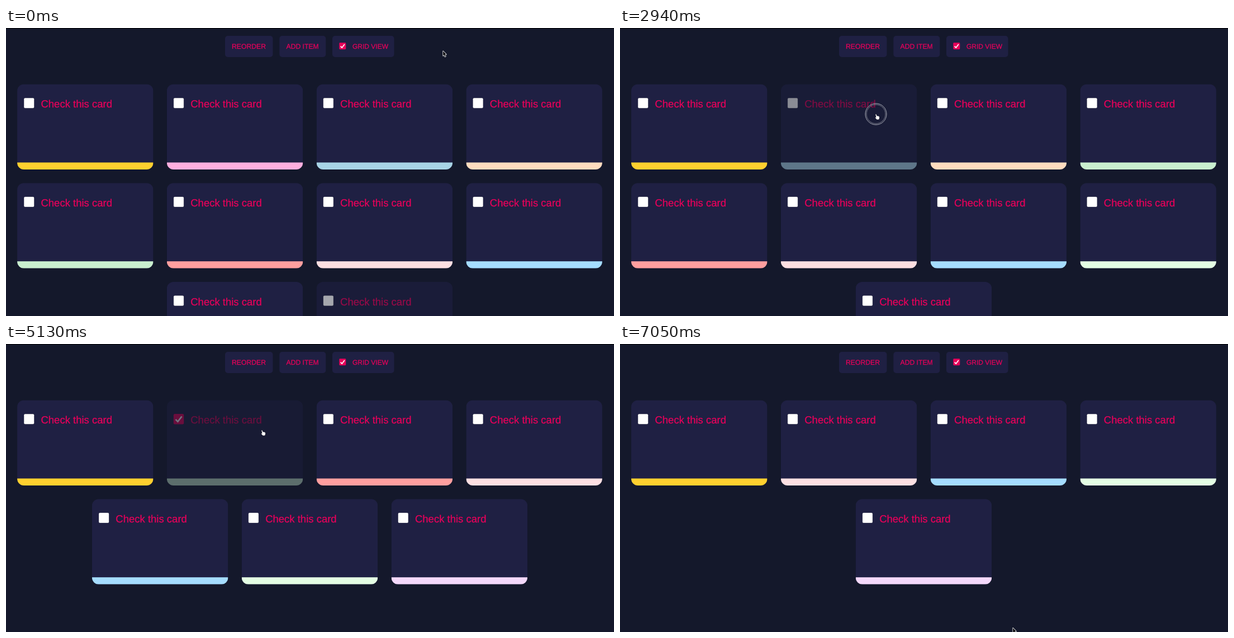
Animation of 1088 by 515 pixels, one loop 7.11 s. Source, as an HTML page with a canvas:

```html
<!DOCTYPE html>
<html lang="en">
<head>
<meta charset="utf-8">
<title>Card grid</title>
<style>
  html, body { margin: 0; width: 100%; height: 100%; overflow: hidden; background: #14182b; }
  canvas { display: block; width: 1088px; height: 515px; }
</style>
</head>
<body>
<canvas id="stage" width="1088" height="515"></canvas>
<script>
const W = 1088, H = 515, LOOP = 7110, STEP = 30;
const BG = '#14182b', PANEL = '#1f2043', RED = '#e8005a';
const FONT = '"Liberation Sans", Arial, sans-serif';
const COLORS = ['#ffd02f', '#ffafdf', '#a8d4e6', '#ffdcbf', '#c9efcf',
                '#ff9f9f', '#fddfe2', '#a5dcff', '#e4fde4', '#f4d8fb'];
const CARD = { w: 243.5, h: 152.5, bar: 12.5, r: 12 };
const PITCH = { x: 267.8, y: 176.7 }, TOP = 100.5, CENTER = 543.5, COLS = 4;

// Each click removes the second card: press, fade out, then the rest closes up.
const CLICKS = [1650, 2940, 3660, 4890, 5940];
const CHECK_AT = 90, RING_END = 120, FADE_FROM = 130, MOVE_FROM = 412, MOVE_TO = 647, DONE = 690;
const REST = [456.5, 153];

const canvas = document.getElementById('stage');
const ctx = canvas.getContext('2d');
const layer = document.createElement('canvas');
layer.width = W;
layer.height = H;
const layerCtx = layer.getContext('2d');

const clamp = v => Math.min(1, Math.max(0, v));
const mix = (a, b, p) => a + (b - a) * p;
const progress = (t, from, to) => clamp((t - from) / (to - from));

// cubic-bezier(.42, 0, .58, 1)
function easeInOut(x) {
  let lo = 0, hi = 1;
  for (let i = 0; i < 24; i++) {
    const s = (lo + hi) / 2, q = 1 - s;
    if (3 * q * q * s * 0.42 + 3 * q * s * s * 0.58 + s * s * s < x) lo = s;
    else hi = s;
  }
  return lo * lo * (3 - 2 * lo);
}

function slot(i, count) {
  const row = Math.floor(i / COLS);
  const inRow = Math.min(COLS, count - row * COLS);
  const width = inRow * PITCH.x - (PITCH.x - CARD.w);
  return [CENTER - width / 2 + (i % COLS) * PITCH.x, TOP + row * PITCH.y];
}

function box(g, x, y, w, h, r, fill) {
  g.beginPath();
  g.roundRect(x, y, w, h, r);
  g.fillStyle = fill;
  g.fill();
}

// A hairline stroke gives the text its slightly heavier weight.
function label(g, text, x, y, size) {
  g.font = size + 'px ' + FONT;
  g.textRendering = 'geometricPrecision';
  g.fillStyle = g.strokeStyle = RED;
  g.lineWidth = 0.25;
  g.fillText(text, x, y);
  g.strokeText(text, x, y);
}

function checkbox(g, x, y, size, checked) {
  const r = size * 0.12;
  if (!checked) {
    box(g, x, y, size, size, r, '#8c8c94');
    box(g, x + 0.4, y + 0.4, size - 0.8, size - 0.8, r * 0.8, '#fff');
    return;
  }
  box(g, x, y, size, size, r, RED);
  g.beginPath();
  g.moveTo(x + size * 0.2, y + size * 0.54);
  g.lineTo(x + size * 0.41, y + size * 0.75);
  g.lineTo(x + size * 0.8, y + size * 0.24);
  g.lineWidth = size * 0.14;
  g.strokeStyle = '#fff';
  g.stroke();
}

function paintCard(g, x, y, color, checked) {
  g.save();
  g.translate(x, y);
  g.save();
  g.beginPath();
  g.roundRect(0, 0, CARD.w, CARD.h, CARD.r);
  g.clip();
  g.fillStyle = PANEL;
  g.fillRect(0, 0, CARD.w, CARD.h);
  g.fillStyle = color;
  g.fillRect(0, CARD.h - CARD.bar, CARD.w, CARD.bar);
  g.restore();
  checkbox(g, 12, 24.5, 18.4, checked);
  label(g, 'Check this card', 42.4, 41.8, 18.5);
  g.restore();
}

function drawCard(x, y, color, checked, alpha) {
  if (alpha >= 1) return paintCard(ctx, x, y, color, checked);
  if (alpha <= 0) return;
  layerCtx.clearRect(0, 0, W, H);
  paintCard(layerCtx, x, y, color, checked);
  ctx.globalAlpha = alpha;
  ctx.drawImage(layer, 0, 0);
  ctx.globalAlpha = 1;
}

function drawToolbar() {
  box(ctx, 392, 14, 85.5, 38, 5, PANEL);
  box(ctx, 489.3, 14, 83, 38, 5, PANEL);
  box(ctx, 584, 14, 110.5, 38, 5, PANEL);
  label(ctx, 'REORDER', 404, 37.4, 12.2);
  label(ctx, 'ADD ITEM', 501.5, 37.4, 12.2);
  label(ctx, 'GRID VIEW', 620, 37.4, 12);
  checkbox(ctx, 596.3, 26.2, 12, true);
}

function drawCards(t) {
  const gone = CLICKS.filter(c => t >= c + DONE).length;
  const since = gone < CLICKS.length ? t - CLICKS[gone] : -1;
  const cards = COLORS.filter((_, i) => i === 0 || i > gone);
  const shift = easeInOut(progress(since, MOVE_FROM, MOVE_TO));

  cards.forEach((color, i) => {
    let [x, y] = slot(i, cards.length);
    let alpha = 1, checked = false;
    if (i === 1 && since >= 0) {
      alpha = 0.5 * (1 - progress(since, FADE_FROM, DONE));
      checked = since >= CHECK_AT;
    } else if (i > 1 && shift > 0) {
      const [nx, ny] = slot(i - 1, cards.length - 1);
      x = mix(x, nx, shift);
      y = mix(y, ny, shift);
    }
    if (color === COLORS[9]) alpha = mix(0.62, 1, progress(t, 0, 120));
    drawCard(x, y, color, checked, alpha);
  });
}

function cursorAt(t) {
  const stops = [[30, 420, 781.5, 40.5], [630, 1290, 560, 118], [6660, 7050, ...REST]];
  const ends = [[560, 118], REST, [702.5, 507]];
  let at = [781.5, 40.5];
  stops.forEach(([from, to, x, y], i) => {
    if (t < from) return;
    const p = easeInOut(progress(t, from, to));
    at = [mix(x, ends[i][0], p), mix(y, ends[i][1], p)];
  });
  return at;
}

function outline(points, fill, stroke, width) {
  ctx.beginPath();
  points.forEach(([x, y]) => ctx.lineTo(x, y));
  ctx.closePath();
  ctx.lineJoin = 'round';
  ctx.lineWidth = width;
  ctx.strokeStyle = stroke;
  ctx.stroke();
  ctx.fillStyle = fill;
  ctx.fill();
}

const ARROW = [[0.7, 0.8], [0.7, 9.2], [2.5, 7.5], [4, 10.8], [5.3, 10.2], [3.9, 7], [6.4, 6.9]];
const HAND = [[0.8, 1.2], [1.8, 1], [3.1, 4.3], [5.6, 4.6], [7.4, 5.6], [7.7, 7.6],
              [6.8, 10.6], [3.2, 10.8], [0.2, 7.6], [0.5, 6.8], [2, 7.2]];

function drawCursor(t) {
  const [x, y] = cursorAt(t);
  const since = Math.min(...CLICKS.map(c => t - c).filter(d => d >= 0));
  if (since < RING_END) {
    ctx.strokeStyle = '#b4b6bf';
    ctx.lineWidth = 1;
    for (const r of [19, 17]) {
      ctx.globalAlpha = r === 19 ? 0.95 : 0.6;
      ctx.beginPath();
      ctx.arc(x + 1.5, y + 1, r, 0, 2 * Math.PI);
      ctx.stroke();
    }
    ctx.globalAlpha = 1;
  }
  const blocked = since >= MOVE_FROM && since < DONE;
  const overCard = y > TOP && y < TOP + CARD.h && x > 287.8 && x < 531.3;
  ctx.save();
  ctx.translate(x, y);
  if (overCard && !blocked) outline(HAND, '#fff', '#101018', 1);
  else outline(ARROW, '#0b0b10', '#f2f2f2', 1.6);
  ctx.restore();
}

function draw(t) {
  ctx.fillStyle = BG;
  ctx.fillRect(0, 0, W, H);
  ctx.fillStyle = '#000';
  ctx.fillRect(0, 0, W, 1);
  drawToolbar();
  drawCards(t);
  drawCursor(t);
}

const start = performance.now();
function tick() {
  const t = (performance.now() - start) % LOOP;
  draw(Math.floor(t / STEP) * STEP);
  requestAnimationFrame(tick);
}
tick();
</script>
</body>
</html>
```
